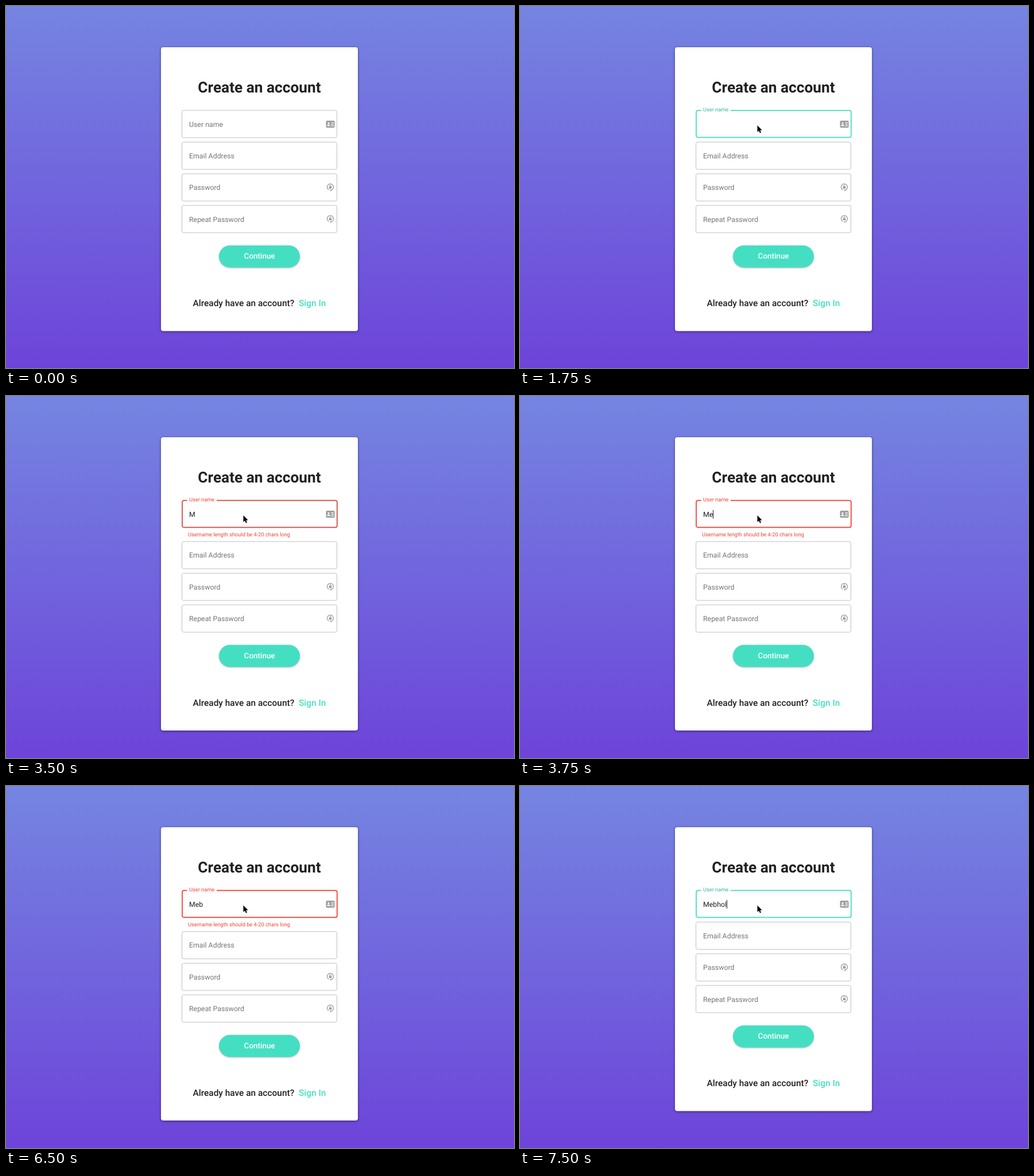
An HTML page for the animation above (8000 ms loop, 885 px wide and 632 px high).

```html
<!DOCTYPE html>
<html lang="en">
<head>
<meta charset="utf-8">
<title>Create an account</title>
<style>
  html, body { margin: 0; width: 100%; height: 100%; overflow: hidden; }
  svg { display: block; width: 885px; height: 632px; }
  text { font-family: Roboto, sans-serif; font-size: 12.35px; fill: #212121; text-rendering: geometricPrecision; }
  .hint { fill: #757575; }
  .small { font-size: 9.26px; }
  .mid { text-anchor: middle; }
  .strong { font-weight: 500; font-size: 15.44px; }
  .box { fill: none; stroke: #c0c0c0; }
  #card { filter: drop-shadow(0 1px 2px rgba(0,0,0,.28)) drop-shadow(0 1px 2px rgba(0,0,0,.18)); }
  #pill { filter: drop-shadow(0 1.5px 1.2px rgba(0,0,0,.3)); }
</style>
</head>
<body>
<svg viewBox="0 0 885 632">
  <defs>
    <linearGradient id="sky" x1="0" y1="0" x2="0" y2="1">
      <stop offset="0" stop-color="#7585e1"/>
      <stop offset="1" stop-color="#6d44d9"/>
    </linearGradient>
    <g id="lock" fill="none" stroke="#9a9a9a" stroke-width="1.3">
      <path d="M-2.6 4.9A5.5 5.5 0 1 1 2.6 4.9L0.6 6.2"/>
      <path d="M-0.6 4.2L2.4 5L0.6 7.4Z" fill="#9a9a9a" stroke="none"/>
      <rect x="-2.3" y="-0.9" width="4.6" height="3.6" rx=".5" fill="#9a9a9a" stroke="none"/>
      <path d="M-1.3 -0.8V-1.7A1.3 1.3 0 0 1 1.3 -1.7V-0.8" stroke-width="1"/>
    </g>
  </defs>
  <rect width="885" height="632" fill="url(#sky)"/>
  <rect id="card" x="270" y="72" width="343" height="495.5" rx="4" fill="#fff"/>
  <text class="mid" x="441.5" y="151" style="font-size:26.25px;font-weight:700">Create an account</text>

  <rect id="idle" class="box" x="306.5" y="182.2" width="270" height="47.6" rx="3"/>
  <path id="focus" fill="none" stroke-width="1.7"
    d="M367 182.4H574a2.8 2.8 0 0 1 2.8 2.8V226.5a2.8 2.8 0 0 1 -2.8 2.8H309.8a2.8 2.8 0 0 1 -2.8 -2.8V185.2a2.8 2.8 0 0 1 2.8 -2.8H315.5"/>
  <text id="rest" class="hint" x="319" y="210.5">User name</text>
  <text id="label" class="small" x="319" y="184.3">User name</text>
  <text id="typed" x="319" y="210.5"></text>
  <rect id="caret" y="199" width="1" height="15" fill="#222"/>
  <g id="badge">
    <rect x="557.5" y="200.2" width="15" height="12.4" rx="1.8" fill="#9c9c9c"/>
    <g fill="#fff">
      <circle cx="562" cy="204.7" r="1.6"/>
      <path d="M559 209.6a3 2.7 0 0 1 6 0z"/>
      <path d="M566.5 203h4.4v1.3h-4.4zM566.5 205.8h4.4v1.3h-4.4zM566.5 208.6h4.4v1.3h-4.4z"/>
    </g>
  </g>
  <text id="error" class="small" x="317" y="245.3" style="fill:#f44336">Username length should be 4-20 chars long</text>

  <g id="lower">
    <g id="fields"></g>
    <rect id="pill" x="371" y="418" width="141" height="38.5" rx="19.25" fill="#44dfc3"/>
    <text class="mid" x="441.6" y="441.4" style="font-size:13.45px;font-weight:500;fill:#fff">Continue</text>
    <text class="strong" x="325.5" y="524.4">Already have an account?</text>
    <text class="strong" x="510" y="524.4" style="fill:#44dfc3">Sign In</text>
  </g>
  <path id="arrow" d="M.5 .5V12L3.2 9.5L5 13.8L6.9 13L5.1 8.8H8.6Z" fill="#000" stroke="#fff" stroke-width=".9" paint-order="stroke"
    style="filter:drop-shadow(0 .7px .7px rgba(0,0,0,.35))"/>
</svg>
<script>
const LOOP = 8000;
const NAME = 'Mebhol';
const TEAL = '#40dcc0', RED = '#f23b2f';
const $ = id => document.getElementById(id);

// step tables: [start ms, value]
const pointer = [[0, null], [250, [493, 76]], [500, [348, 200]], [750, [363, 208]], [1000, [400, 209]], [1250, [413, 208]]];
const letters = [[0, 0], [3500, 1], [3750, 2], [4000, 3], [7000, 4], [7250, 5], [7500, 6]];
const blink = [[0, 0], [1250, 1], [1750, 0], [2500, 1], [3000, 0], [3750, 1], [4000, 0],
  [4750, 1], [5250, 0], [5750, 1], [6500, 0], [7000, 1]];
const outline = [[0, null], [1500, TEAL], [3500, '#d2483b'], [3750, RED], [7000, '#3cc4a9'], [7250, TEAL]];
const tint = [[0, '#757575'], [1750, '#34b9a0'], [3500, '#f44336'], [7000, '#34b9a0']];

const at = (steps, t) => steps.filter(s => s[0] <= t).pop()[1];
const show = (id, on) => $(id).setAttribute('visibility', on ? 'visible' : 'hidden');

$('fields').innerHTML = ['Email Address', 'Password', 'Repeat Password'].map((name, i) => {
  const y = 237.6 + i * 55.3;
  return `<rect class="box" x="306.5" y="${y}" width="270" height="47.6" rx="3"/>` +
    `<text class="hint" x="319" y="${y + 28.3}">${name}</text>` +
    (i ? `<use href="#lock" x="565" y="${y + 23.1}"/>` : '');
}).join('');

function draw(t) {
  const pos = at(pointer, t), color = at(outline, t), count = at(letters, t);
  const bad = t >= 3500 && t < 7000;
  const drop = bad ? 16.5 : 0;

  show('idle', !color);
  show('focus', color);
  show('rest', !color);
  show('label', color);
  $('idle').style.stroke = t >= 1000 ? '#2a2a2a' : '';
  $('focus').setAttribute('stroke', color || 'none');
  $('label').style.fill = at(tint, t);

  $('typed').textContent = NAME.slice(0, count);
  const width = count ? $('typed').getComputedTextLength() : 0;
  $('caret').setAttribute('x', Math.floor(319 + width));
  show('caret', at(blink, t));

  show('error', bad);
  $('card').setAttribute('height', 495.5 + drop);
  $('lower').setAttribute('transform', `translate(0 ${drop})`);

  show('arrow', pos);
  if (pos) $('arrow').setAttribute('transform', `translate(${pos})`);
}

const start = performance.now();
function tick() {
  draw((performance.now() - start) % LOOP);
  requestAnimationFrame(tick);
}
tick();
</script>
</body>
</html>
```
